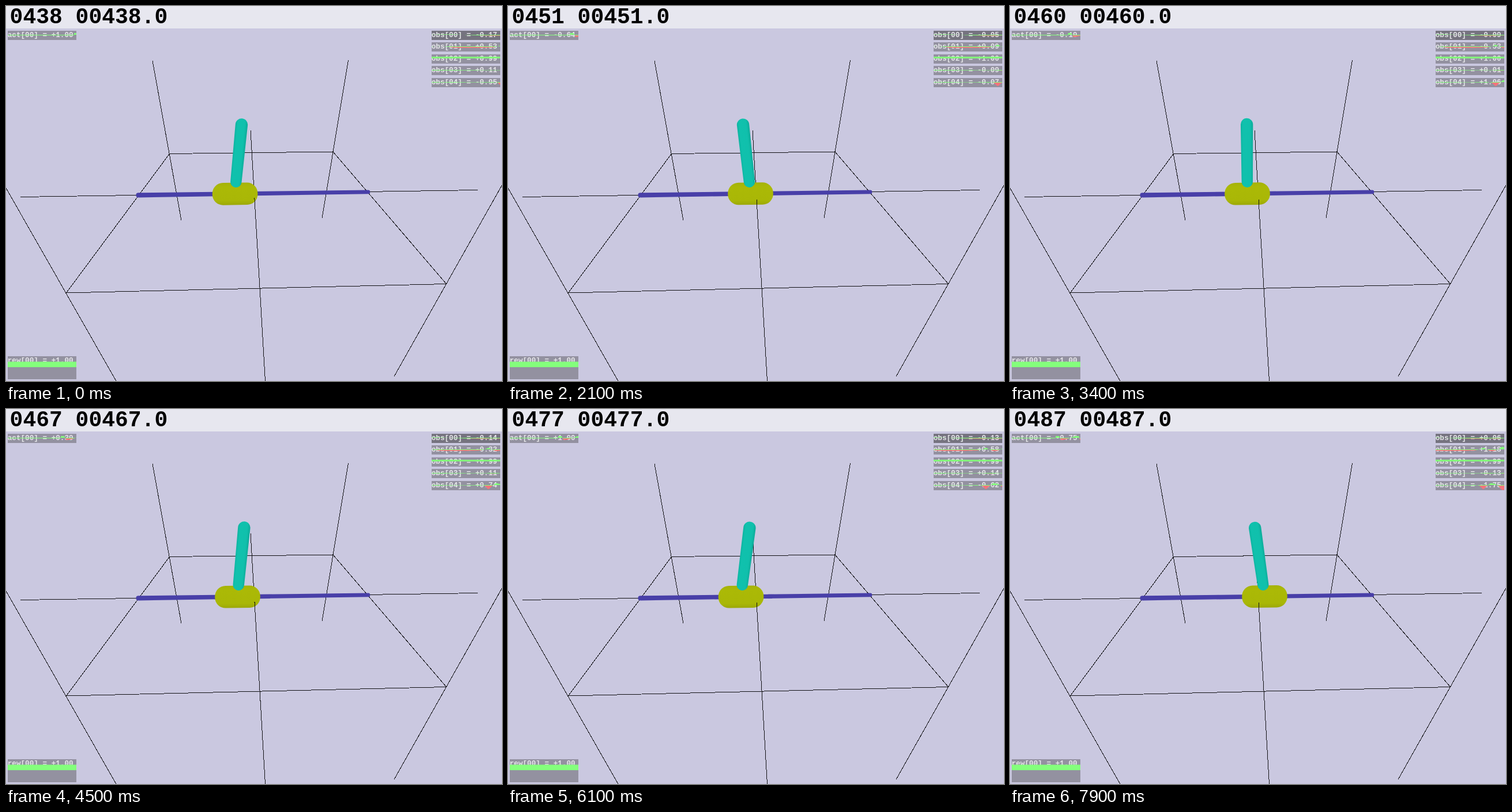
Write an HTML page that moves like this. It is 860x651 px and loops after 8 s.

```html
<!DOCTYPE html>
<html>
<head>
<meta charset="utf-8">
<title>Inverted pendulum</title>
<style>
html, body { margin: 0; width: 100%; height: 100%; overflow: hidden; background: #cac8e0; }
svg { display: block; width: 860px; height: 651px; }
text { font-family: "Liberation Mono", monospace; font-weight: bold; white-space: pre; }
.label { font-size: 12.667px; fill: #e6e6ea; }
.grid { stroke: #111114; stroke-width: 1; fill: none; shape-rendering: crispEdges; }
</style>
</head>
<body>
<svg id="stage" viewBox="0 0 860 651" xmlns="http://www.w3.org/2000/svg">
  <defs>
    <linearGradient id="teal">
      <stop offset="0" stop-color="#0eb3a0"/>
      <stop offset=".2" stop-color="#10c1ad"/>
      <stop offset=".75" stop-color="#10c0ac"/>
      <stop offset="1" stop-color="#0dab99"/>
    </linearGradient>
    <linearGradient id="olive" x2="0" y2="1">
      <stop offset="0" stop-color="#a5b208"/>
      <stop offset=".2" stop-color="#abb906"/>
      <stop offset=".8" stop-color="#a9b706"/>
      <stop offset="1" stop-color="#9ca807"/>
    </linearGradient>
  </defs>
  <rect width="860" height="651" fill="#cac8e0"/>
  <path class="grid" d="M283.5 256.5L567 253L763.5 482.5L104.5 498Z
    M254 95L304 372M593.5 94L548 368M0 316L191 651M860 311L673 643
    M25 331.5L818 319.5M424 216L449.5 651"/>
  <path fill="#483fa8" d="M229.5 324.3L628 319.6A3.3 3.3 0 0 1 628 326.2L229.5 332.5A4.1 4.1 0 0 1 229.5 324.3Z"/>
  <rect id="cart" x="-39.3" y="-19.4" width="78.6" height="38.6" rx="18.5" fill="url(#olive)"/>
  <path id="axis" class="grid"/>
  <path id="pole" fill="url(#teal)" d="M-9.7 0L-10.7 -99.8A10.7 10.7 0 0 1 10.7 -99.8L9.7 0A9.7 9.7 0 0 1 -9.7 0Z"/>
  <rect width="860" height="39" fill="#e7e7ef"/>
  <text id="title" x="6.6" y="30" font-size="38"></text>
  <g id="panels"></g>
</svg>
<script>
const LOOP = 8000, FIRST = 438, DT = 0.0165;
// Time each simulation step stays on screen, in tenths of a second.
const HOLDS = "2212121221212112212121221212122122122112302212" + "3121";
const WIDTH = 119, SAMPLES = 150;

// step, position, velocity, angle, angular velocity
const STATES = [
  [288, .3, .1, 0, 0],
  [335, .4, -.35, .02, 0],
  [424, -.2, -.25, .13, 0],
  [438, -.167, .53, .107, -.95],
  [445, -.0755, .63, -.0449, -1.06],
  [451, -.0474, .09, -.094, -.07],
  [460, -.0934, -.53, .006, 1.06],
  [467, -.1444, -.32, .107, .74],
  [477, -.1316, .58, .136, -.62],
  [487, .0597, 1.18, -.126, -1.75]
];
// step, action
const ACTIONS = [[288, 0], [433, 0], [434, 1], [441, 1], [445, -.69], [451, -.64],
  [460, -.19], [467, .39], [477, 1], [484, 1], [487, -.75]];

const $ = id => document.getElementById(id);

function segment(keys, n) {
  let i = 0;
  while (i < keys.length - 2 && n > keys[i + 1][0]) i++;
  const a = keys[i], b = keys[i + 1];
  return { a, b, u: (n - a[0]) / (b[0] - a[0]) };
}

// Cubic through value and slope at both ends; returns [value, slope].
function hermite(p, v, q, w, span, u) {
  const d = q - p, c2 = 3 * d - (2 * v + w) * span, c3 = (v + w) * span - 2 * d;
  return [
    p + u * (v * span + u * (c2 + u * c3)),
    v + u * (2 * c2 + 3 * u * c3) / span
  ];
}

function simulate(n) {
  const { a, b, u } = segment(STATES, n), span = (b[0] - a[0]) * DT;
  const [x, v] = hermite(a[1], a[2], b[1], b[2], span, u);
  const [angle, spin] = hermite(a[3], a[4], b[3], b[4], span, u);
  const k = segment(ACTIONS, n);
  return { x, angle, obs: [x, v, Math.cos(angle), angle, spin],
    act: k.a[1] + (k.b[1] - k.a[1]) * k.u };
}

const states = {};
for (let n = FIRST - SAMPLES; n < FIRST + HOLDS.length; n++) states[n] = simulate(n);

function add(tag, attrs) {
  const el = document.createElementNS("http://www.w3.org/2000/svg", tag);
  for (const key in attrs) el.setAttribute(key, attrs[key]);
  return $("panels").appendChild(el);
}

function makePanel(name, x, y, height, scale, read, fill = "#9391a0") {
  add("rect", { x, y, width: WIDTH, height, fill });
  const text = add("text", { class: "label", x: x - .3, y: y + 11.3 });
  const minus = add("path", { fill: "#f4747c" });
  const plus = add("path", { fill: "#84ff7c" });
  const mid = y + height / 2, step = WIDTH / SAMPLES;
  return n => {
    const value = read(states[n]);
    text.textContent = `${name} = ${value < 0 ? "-" : "+"}${Math.abs(value).toFixed(2)}`;
    let up = `M${x} ${mid - 1}h${WIDTH}v1h${-WIDTH}z`, down = "";
    for (let i = 0; i < SAMPLES; i++) {
      const h = read(states[n - SAMPLES + 1 + i]) * scale;
      const bar = `M${(x + i * step).toFixed(2)} ${mid}h${step.toFixed(3)}v${(-h).toFixed(2)}h${(-step).toFixed(3)}z`;
      if (h > 0) up += bar; else down += bar;
    }
    plus.setAttribute("d", up);
    minus.setAttribute("d", down);
  };
}

const panels = [
  makePanel("act[00]", 3, 43, 16, 4, s => s.act),
  makePanel("rew[00]", 3, 608, 40, 10.5, () => 1),
  ...[43, 63, 84, 104, 125].map((y, i) =>
    makePanel(`obs[0${i}]`, 738, y, 16, 4, s => s.obs[i], i ? undefined : "#75737f"))
];

function stepAt(ms) {
  let end = 0;
  for (let i = 0; i < HOLDS.length; i++) {
    end += HOLDS[i] * 100;
    if (ms < end) return FIRST + i;
  }
  return FIRST + HOLDS.length - 1;
}

function draw(n) {
  const { x, angle } = states[n];
  const cx = 429.8 + 196 * x;
  const cy = 328.5 - (cx - 229.5) * .0138;
  $("title").textContent = `0${n} 00${n}.0`;
  $("cart").setAttribute("transform", `translate(${cx} ${cy}) rotate(-.8)`);

  // The depth axis comes out of the cart sooner near its rounded end.
  const inset = Math.min(1, Math.max(0, (cx + 34 - 431) / 8));
  const y = 333 + 3 * inset;
  $("axis").setAttribute("d", `M${424 + (y - 216) * .0586} ${y}L449.5 651`);

  const tilt = Math.atan((103 * angle - 1.3) / 100) * 180 / Math.PI;
  $("pole").setAttribute("transform", `translate(${cx + 19 * angle - .3} 305.3) rotate(${tilt})`);
  panels.forEach(update => update(n));
}

let shown;
function tick() {
  const n = stepAt(performance.now() % LOOP);
  if (n !== shown) draw(shown = n);
  requestAnimationFrame(tick);
}
tick();
</script>
</body>
</html>
```
